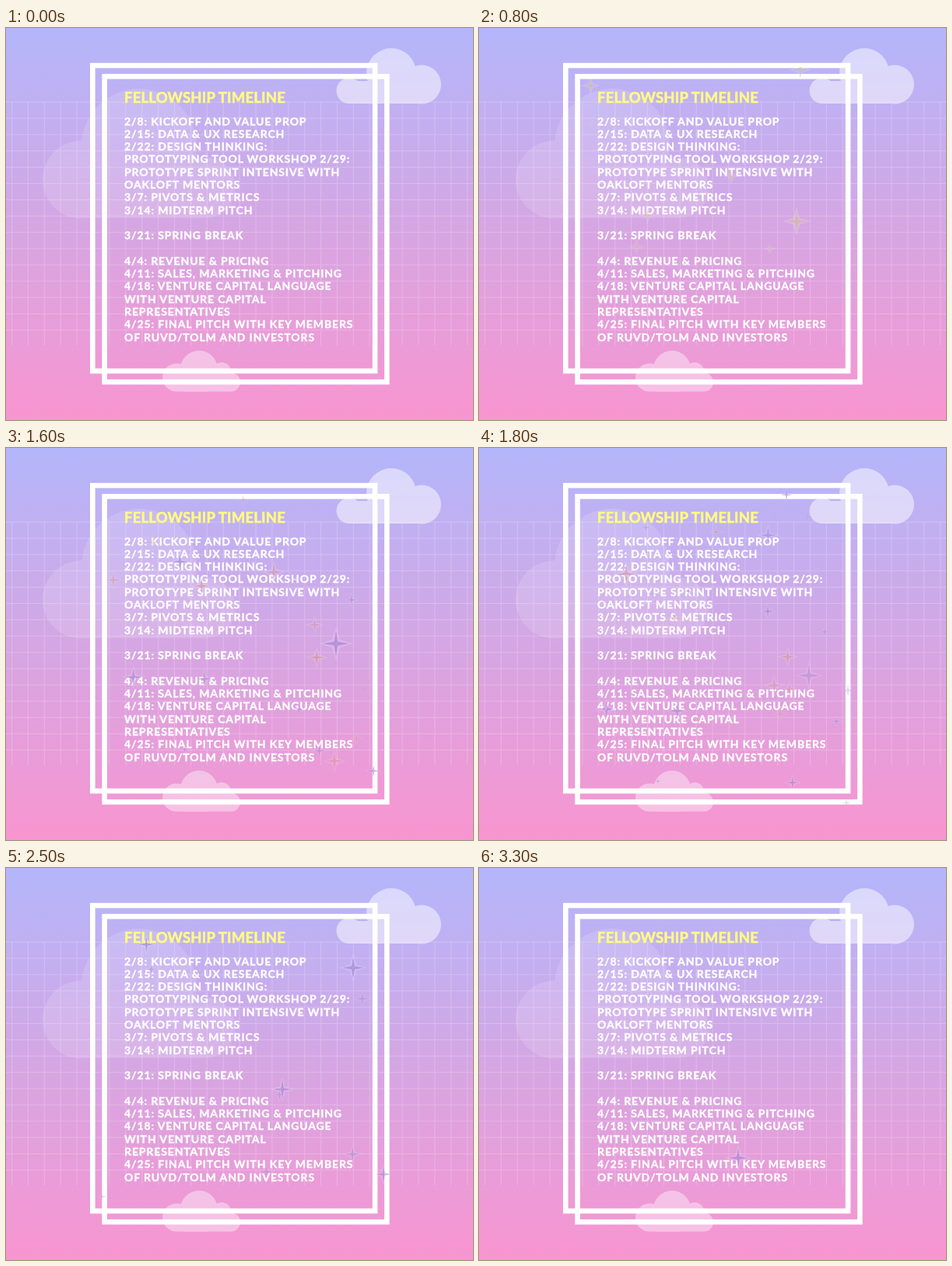
Animation of 600x503 px, one loop 3400 ms. Source, as an HTML page with a canvas:

```html
<!DOCTYPE html>
<html lang="en">
<head>
<meta charset="utf-8">
<title>Fellowship timeline</title>
<style>
html, body { margin: 0; width: 100%; height: 100%; overflow: hidden; }
body { position: relative; background: linear-gradient(#b3b6fb, #d5a6e3 50%, #f895d0); }
svg, canvas { position: absolute; left: 0; top: 0; }
h1, pre { position: absolute; left: 152px; margin: 0; white-space: pre; font-family: Lato, "Open Sans", sans-serif; font-weight: 700; }
h1 { top: 78.5px; font-size: 18.5px; line-height: 20px; letter-spacing: .2px; color: #fffa82; -webkit-text-stroke: .6px #fffa82; }
pre { top: 111.5px; font-size: 14px; line-height: 16.3px; letter-spacing: .88px; color: #fff; -webkit-text-stroke: .4px #fff; }
</style>
</head>
<body>
<svg width="600" height="503" fill="#fff">
  <defs>
    <pattern id="grid" x="7" y="94.5" width="20.9" height="20.9" patternUnits="userSpaceOnUse">
      <path d="M0 .5H21M.5 0V21" stroke="#fff" stroke-opacity=".22"/>
    </pattern>
  </defs>
  <rect y="94" width="600" height="313" fill="url(#grid)"/>
  <g opacity=".14">
    <circle cx="97" cy="194.5" r="50"/>
    <circle cx="171" cy="152" r="74"/>
    <circle cx="256" cy="205" r="39"/>
    <rect x="97" y="180" width="159" height="64"/>
  </g>
  <g opacity=".5">
    <circle cx="441" cy="80.5" r="16.5"/>
    <circle cx="495" cy="58" r="32"/>
    <circle cx="534" cy="72.5" r="25"/>
    <rect x="441" y="68" width="93" height="29"/>
  </g>
  <g opacity=".4">
    <circle cx="219" cy="448.5" r="18"/>
    <circle cx="248" cy="438" r="24"/>
    <circle cx="277" cy="441" r="12"/>
    <rect x="219" y="442.5" width="82" height="24" rx="12"/>
    <rect x="219" y="448" width="40" height="18.5"/>
  </g>
  <g fill="none" stroke="#fff" stroke-width="6.6">
    <rect id="frame" x="111.3" y="48.1" width="362.8" height="392"/>
    <use href="#frame" x="15.3" y="14.1"/>
  </g>
</svg>
<h1>FELLOWSHIP TIMELINE</h1>
<pre>2/8: KICKOFF AND VALUE PROP
2/15: DATA &amp; UX RESEARCH
2/22: DESIGN THINKING:
PROTOTYPING TOOL WORKSHOP 2/29:
PROTOTYPE SPRINT INTENSIVE WITH
OAKLOFT MENTORS
3/7: PIVOTS &amp; METRICS
3/14: MIDTERM PITCH

3/21: SPRING BREAK

4/4: REVENUE &amp; PRICING
4/11: SALES, MARKETING &amp; PITCHING
4/18: VENTURE CAPITAL LANGUAGE
WITH VENTURE CAPITAL
REPRESENTATIVES
4/25: FINAL PITCH WITH KEY MEMBERS
OF RUVD/TOLM AND INVESTORS</pre>
<canvas width="600" height="503"></canvas>
<script>
const LOOP = 3400, STEP = 100, HALF_LIFE = 340, FALL = 0.205;
const ctx = document.querySelector('canvas').getContext('2d');

let seed = 7;
const rand = (lo, hi) => {
  seed = (seed * 16807) % 2147483647;
  return lo + (hi - lo) * seed / 2147483647;
};

// Stars turn from warm to violet as the shower goes on.
const star = (peak, x, y, size) =>
  ({ peak, x, y, size, violet: rand(0, 1) < (peak - 800) / 1700 });

// The largest stars, then a shower that is densest in the middle of the loop.
const stars = [
  star(800, 408, 248, 14),
  star(1200, 393, 99, 14),
  star(1600, 424, 251, 17),
  star(2100, 422, 150, 13),
  star(2500, 446, 128, 14),
  star(3300, 333, 372, 13)
];
for (let i = 0; i < 56; i++) {
  const peak = 360 + rand(0, 1295) + rand(0, 1295);
  stars.push(star(peak, rand(115, 488), rand(52, Math.min(435, 220 + peak / 8)), rand(5, 13)));
}

// Four points joined through a narrow waist.
function sparkle(x, y, r, waist) {
  ctx.beginPath();
  for (let i = 0; i < 8; i++) {
    const a = i * Math.PI / 4, d = i % 2 ? r * waist : r;
    ctx.lineTo(x + d * Math.cos(a), y + d * Math.sin(a));
  }
  ctx.fill();
}

function draw(t) {
  ctx.clearRect(0, 0, 600, 503);
  ctx.save();
  ctx.beginPath();
  ctx.rect(108, 50, 386, 417);
  ctx.clip();
  const hue = Math.min(40, 40 - (t - 800) / 20);
  for (const s of stars) {
    const age = t - s.peak, life = 1 - (age / HALF_LIFE) ** 2;
    if (life <= 0) continue;
    const y = s.y + age * FALL, r = s.size * (0.5 + 0.5 * life);
    ctx.globalAlpha = 0.18 * life;
    ctx.fillStyle = '#fff';
    sparkle(s.x, y, r * 1.3, 0.32);
    ctx.globalAlpha = 0.55 * life;
    ctx.fillStyle = s.violet ? 'hsl(262 48% 64%)' : `hsl(${hue} 42% 68%)`;
    sparkle(s.x, y, r, 0.2);
  }
  ctx.restore();
}

function tick() {
  const t = performance.now() % LOOP;
  draw(Math.floor(t / STEP) * STEP);
  requestAnimationFrame(tick);
}
tick();
</script>
</body>
</html>
```
